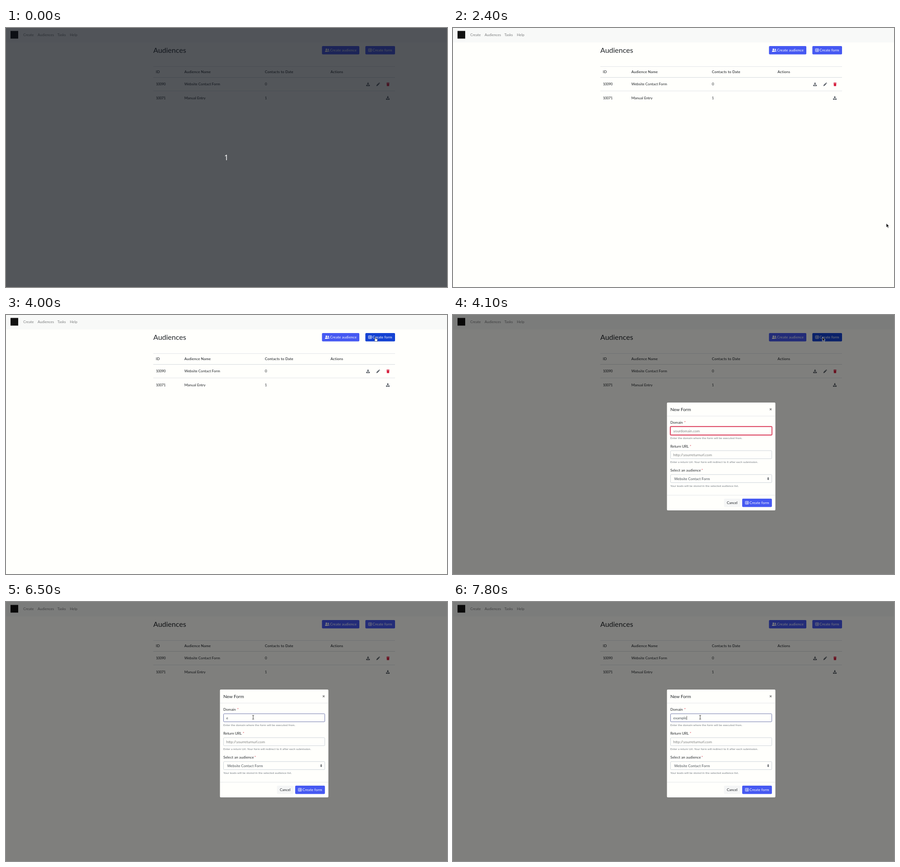
Write an HTML page that moves like this. It is 976x574 px and loops after 8 s.

```html
<!DOCTYPE html>
<html lang="en">
<head>
<meta charset="utf-8">
<title>Create form</title>
<style>
  html, body { margin: 0; width: 100%; height: 100%; overflow: hidden; background: #fffffc; }
  svg { display: block; }
  text { font: 8px Lato, "Open Sans", sans-serif; fill: #212529; white-space: pre; }
  .nav text, .field { fill: #7c7e7f; }
  .head text { font-weight: 500; letter-spacing: .2px; }
  .btn rect { fill: #4659f2; }
  .btn text { fill: #fffffc; letter-spacing: .13px; }
  .btn use { color: #fffffc; }
  .num { letter-spacing: -.4px; }
  .hint { font-size: 6.4px; fill: #747b82; letter-spacing: .05px; }
  .star { fill: #dc3545; }
  .box { fill: #fffffc; stroke: #ced4da; }
  .actions { color: #5c6269; }
</style>
</head>
<body>
<svg width="976" height="574" viewBox="0 0 976 574">
  <defs>
    <g id="list">
      <rect x=".4" y=".4" width="7.2" height="6.4" rx=".8" fill="none" stroke="currentColor" stroke-width=".8"/>
      <path d="M1.4 2.2h1M3 2.2h3.6M1.4 3.7h1M3 3.7h3.6M1.4 5.2h1M3 5.2h3.6" stroke="currentColor" stroke-width=".8"/>
    </g>
    <g id="users" fill="currentColor">
      <circle cx="3.1" cy="2" r="1.9"/><path d="M0 7.4V6.2Q0 4.4 1.8 4.4H4.4Q6.2 4.4 6.2 6.2V7.4Z"/>
      <circle cx="7.4" cy="2.3" r="1.5"/><path d="M6 4.4H8Q9.6 4.4 9.6 6V6.9H6.8V6Q6.8 5 6 4.4Z"/>
    </g>
    <g id="download" fill="currentColor">
      <path d="M3 0H5V2.8H6.8L4 5.6 1.2 2.8H3Z"/>
      <path d="M0 5.2H2.2L4 7 5.8 5.2H8V8H0Z"/>
    </g>
    <path id="pencil" fill="currentColor" d="M0 8L.4 5.7 4.7 1.4 6.6 3.3 2.3 7.6ZM5.2.9L5.9.2Q6.3-.1 6.7.2L7.8 1.3Q8.1 1.7 7.8 2.1L7.1 2.8Z"/>
    <path id="trash" fill="currentColor" d="M0 .6H2L2.4 0H4.4L4.8.6H6.8V1.5H0ZM.5 2H6.3L5.9 8H.9Z"/>
  </defs>

  <rect width="976" height="574" fill="#fffffc"/>
  <rect width="976" height="32" fill="#f8f9f8"/>
  <rect x="10" y="6.5" width="17" height="17" fill="#111"/>
  <g class="nav">
    <text x="38.3" y="18">Create</text><text x="70" y="18">Audiences</text>
    <text x="113.8" y="18">Tasks</text><text x="141.3" y="18">Help</text>
  </g>
  <text x="326" y="55" style="font-size:16px">Audiences</text>
  <g class="btn">
    <rect x="699.3" y="40" width="82.7" height="18.5" rx="2"/>
    <use href="#users" x="706" y="45.3"/><text x="717.3" y="52">Create audience</text>
    <rect id="formBtn" x="795.3" y="40" width="65.7" height="18.5" rx="2"/>
    <use href="#list" x="801.7" y="45.5"/><text x="811.3" y="52">Create form</text>
  </g>

  <rect id="row1" x="326" y="110" width="535" height="29.5" fill="#ececea"/>
  <rect id="row2" x="326" y="140" width="535" height="30" fill="#ececea"/>
  <path d="M326 85.5H861M326 139.5H861" stroke="#e1e4e7"/>
  <path d="M326 109.5H861" stroke="#d5d9dd"/>
  <g class="head">
    <text x="331.7" y="100.3">ID</text><text x="394.8" y="100.3">Audience Name</text>
    <text x="573" y="100.3">Contacts to Date</text><text x="718.3" y="100.3">Actions</text>
  </g>
  <text class="num" x="331.7" y="127.4">10090</text><text x="394.8" y="127.4">Website Contact Form</text><text x="573" y="127.4">0</text>
  <text class="num" x="331.7" y="157.8">10071</text><text x="394.8" y="157.8">Manual Entry</text><text x="572.7" y="157.8">1</text>
  <g class="actions">
    <use href="#download" x="797.2" y="120.7"/><use href="#pencil" x="819.7" y="120.7"/>
    <use href="#trash" x="842" y="120.7" color="#d6203f"/><use href="#download" x="841" y="151"/>
  </g>

  <g id="modal">
    <rect width="976" height="574" fill="#000" opacity=".5"/>
    <rect x="473.5" y="194" width="240" height="239" rx="2" fill="#fffffc"/>
    <path d="M474 224H713M474 399.3H713" stroke="#e3e6e8"/>
    <text x="481" y="213" style="font-size:10px">New Form</text>
    <path d="M701 207l4 4m0-4l-4 4" stroke="#777" stroke-width="1.2"/>

    <text x="481" y="240.8">Domain</text><text class="star" x="511.5" y="240.8">*</text>
    <rect id="glow" x="480.8" y="247" width="225.2" height="19.2" rx="2" fill="none" stroke="#e5627a" stroke-width="2"/>
    <rect id="domainBox" class="box" x="481.5" y="247.7" width="224" height="17.8" rx="1.6"/>
    <text id="domain" class="field" x="487.6" y="259.5"></text>
    <path id="caret" d="M0 252.3V261.5" stroke="#333" stroke-width=".7"/>
    <text class="hint" x="481" y="274.5">Enter the domain where the form will be executed from.</text>

    <text x="481" y="293.8">Return URL</text><text class="star" x="524" y="293.8">*</text>
    <rect class="box" x="481.5" y="300.7" width="224" height="17.8" rx="1.6"/>
    <text class="field" x="487.6" y="312.5">http://yourreturnurl.com</text>
    <text class="hint" x="481" y="327.5">Enter a return Url. Your form will redirect to it after each submission.</text>

    <text x="481" y="346.8" letter-spacing=".12">Select an audience</text><text class="star" x="549.8" y="346.8">*</text>
    <rect class="box" x="481.5" y="353.7" width="224" height="17.8" rx="1.6"/>
    <text x="489.5" y="365.6" style="fill:#495057">Website Contact Form</text>
    <path d="M695.5 362.2l2-2.6 2 2.6zM695.5 363.3l2 2.6 2-2.6z" fill="#343a40"/>
    <text class="hint" x="481" y="380.6">Your leads will be stored in the selected audience list.</text>

    <rect x="599.7" y="407" width="36.5" height="18.5" rx="2" fill="#f5f6f6"/>
    <text x="606" y="419">Cancel</text>
    <g class="btn">
      <rect x="640" y="407" width="65.8" height="18.5" rx="2"/>
      <use href="#list" x="646.5" y="412.5"/><text x="656.2" y="419">Create form</text>
    </g>
  </g>

  <g id="tip">
    <rect x="547" y="266" width="89" height="21" rx="2.5" fill="#222" opacity=".9"/>
    <text x="591.5" y="279" text-anchor="middle" style="fill:#fff;font-size:7px">Please fill out this field.</text>
  </g>

  <g id="cursor">
    <path id="arrow" d="M0 0V9L2.1 7.1 3.6 10.4 5.1 9.7 3.6 6.5H6.4Z" fill="#111" stroke="#fff" stroke-width=".6"/>
    <path id="hand" d="M-.9.3Q0-.7.9.3V3.6L4 4.2Q4.9 4.5 4.8 5.6L4 9.6H-.2L-2.5 6.2Q-2.5 5-.9 5.8Z" fill="#fff" stroke="#222" stroke-width=".6"/>
    <path id="beam" d="M-2-4.2H-.7L0-3.6.7-4.2H2M0-3.6V3.6M-2 4.2H-.7L0 3.6.7 4.2H2" fill="none" stroke="#222" stroke-width=".9"/>
  </g>

  <g id="countdown">
    <rect width="976" height="574" fill="#0b0f16" opacity=".7"/>
    <text x="487.6" y="293" text-anchor="middle" style="font:16px 'Noto Sans',sans-serif;fill:#fff">1</text>
  </g>
</svg>
<script>
const $ = id => document.getElementById(id);
const show = (id, on) => $(id).style.display = on ? '' : 'none';

// time, x, y of the pointer
const path = [
  [2400, 959, 433], [3000, 832, 108.5], [3100, 832, 108.5], [3200, 845, 57], [3300, 853, 51],
  [3400, 853, 51], [3500, 817.5, 49], [4400, 817.5, 49], [5000, 486, 262], [5300, 547, 255.5]
];
const keys = [6500, 6800, 7000, 7200, 7400, 7500, 7700];

function pointer(t) {
  const i = path.findIndex(p => p[0] > t);
  if (i < 0) return path.at(-1).slice(1);
  if (i === 0) return path[0].slice(1);
  const [t0, x0, y0] = path[i - 1], [t1, x1, y1] = path[i];
  const u = (t - t0) / (t1 - t0), e = u * u * (3 - 2 * u);
  return [x0 + (x1 - x0) * e, y0 + (y1 - y0) * e];
}

function draw(time) {
  const t = Math.floor(time % 8000 / 100) * 100;  // screen refreshes ten times a second
  const [x, y] = pointer(t);
  const within = (l, top, r, b) => x >= l && x <= r && y >= top && y <= b;
  const open = t >= 4100, focused = t >= 5400;
  const onButton = !open && within(795, 40, 861, 58.5);
  const onInput = open && within(481, 247, 706, 266);

  show('countdown', t < 500);
  show('modal', open);
  show('tip', t >= 5700 && t < 6500);
  show('row1', !open && within(326, 110, 861, 139));
  show('row2', !open && within(326, 140, 861, 170));
  $('formBtn').style.fill = onButton || t === 4100 ? '#1442d3' : '';

  show('cursor', t >= 2400);
  $('cursor').setAttribute('transform', `translate(${x} ${y})`);
  show('hand', onButton);
  show('beam', onInput);
  show('arrow', !onButton && !onInput);

  const typed = 'example'.slice(0, keys.filter(k => k <= t).length);
  const domain = $('domain');
  domain.textContent = typed || 'yourdomain.com';
  domain.style.fill = typed ? '#495057' : '';
  show('glow', !focused);
  $('domainBox').style.stroke = focused ? '#7078ad' : '#d4314f';
  show('caret', t >= 7800);
  if (t >= 7800) $('caret').setAttribute('transform', `translate(${488.1 + domain.getComputedTextLength()} 0)`);
}

const start = performance.now();
function loop() {
  draw(performance.now() - start);
  requestAnimationFrame(loop);
}
loop();
</script>
</body>
</html>
```
